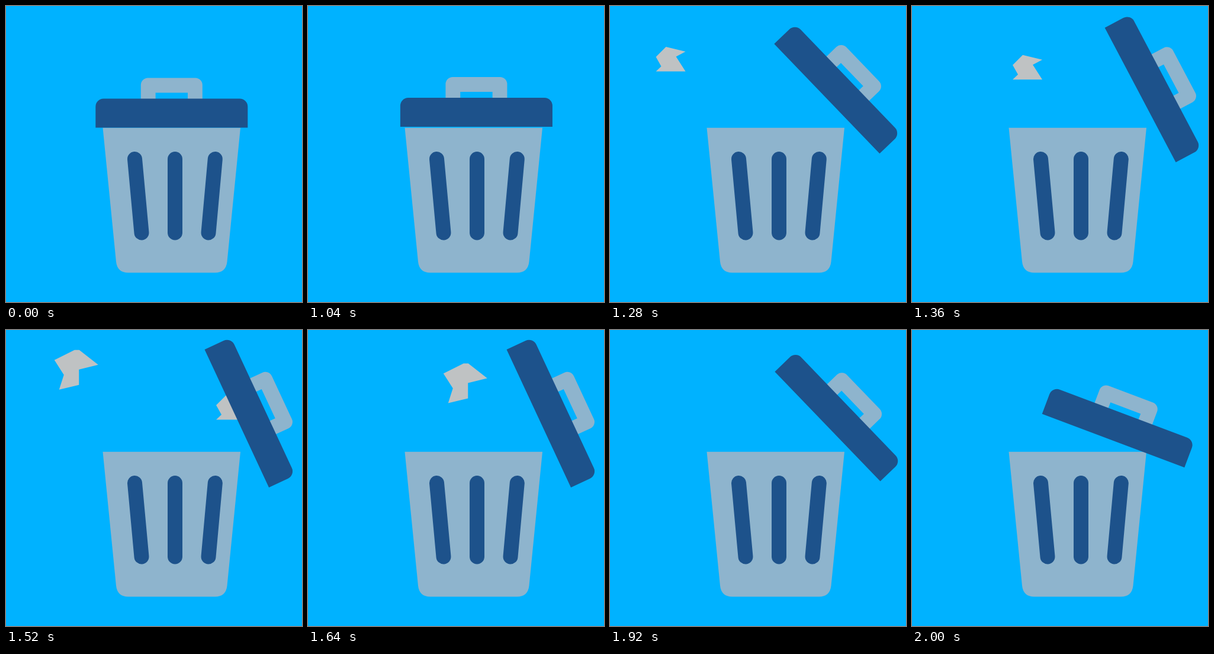
These frames come from a looping animation (500x500 px, 2.04 s). An HTML page:

```html
<!DOCTYPE html>
<html lang="en">
<head>
<meta charset="utf-8">
<title>Trash can</title>
<style>
  html, body { margin: 0; width: 100%; height: 100%; overflow: hidden; background: #00b2ff; }
  svg { display: block; width: 100vw; height: 100vh; }
  .light { fill: #8eb4cd; }
  .dark { fill: #1d528b; }
  .paper { fill: #bfc2c3; }
  .slots { fill: none; stroke: #1d528b; stroke-width: 25; stroke-linecap: round; }
</style>
</head>
<body>
<svg viewBox="0 0 500 500">
  <clipPath id="stage"><rect x="8" width="484" height="500"/></clipPath>
  <g clip-path="url(#stage)" class="paper">
    <path id="small" d="M-25 -4L-8 -21L25 -13L9 -4.5L25 20.5H-25L-16 12Z"/>
    <path id="large" d="M-37 -16L-3 -33H5L37 -8L4.5 0V26L-29 34L-21 9Z"/>
  </g>
  <path class="light" d="M163.5 205.8H396L373.5 432Q371.5 450.5 353 450.5H206.5Q188 450.5 186 432Z"/>
  <path class="slots" d="M217.5 258.5L229 383M285.5 258.5V383M353.3 258.5L342 383"/>
  <g id="lid">
    <path class="light" d="M-52 -48V-72A12 12 0 0 1 -40 -84H40A12 12 0 0 1 52 -72V-48H27.2V-59H-27.2V-48Z"/>
    <path class="dark" d="M-128.5 0V-35.5A13.5 13.5 0 0 1 -115 -49H115A13.5 13.5 0 0 1 128.5 -35.5V0Z"/>
  </g>
</svg>
<script>
  const LOOP = 2040, STEP = 40;
  const OPENING = 1000, OPEN = 1400, TURN = 1600;

  const small = { hit: 1520, x: 380, y: 131, vx: 1.156, vy: 0.1705 };
  const large = { hit: 1690, x: 327, y: 99, vx: 1.225, vy: 0.19 };

  // Power ease in and out; mid is the value reached at half time
  function ease(t, from, to, power, mid) {
    const u = Math.min(1, Math.max(0, (t - from) / (to - from)));
    return u < 0.5
      ? mid * (2 * u) ** power
      : 1 - (1 - mid) * (2 - 2 * u) ** power;
  }

  function place(id, x, y, angle = 0) {
    document.getElementById(id)
      .setAttribute("transform", `translate(${x} ${y}) rotate(${angle})`);
  }

  // Closing runs the opening backwards on a lower path
  function moveLid(t) {
    const closing = t > TURN;
    const time = closing ? 2 * TURN - t : t;
    const across = ease(time, OPENING, OPEN, 1.57, closing ? 0.547 : 0.525);
    const up = ease(time, OPENING, OPEN, 2, closing ? 0.33 : 0.646);
    const turn = ease(time, OPENING + 80, OPEN, 1.73, 0.522);
    place("lid", 279.8 + 110 * across, 205.5 - 56 * up, 65 * turn);
  }

  // Straight flight to the lid, then a drop into the can
  function throwPaper(id, p, t) {
    const flight = Math.min(0, t - p.hit);
    const fall = Math.min(160, Math.max(0, t - p.hit));
    place(id,
      p.x + p.vx * flight - 0.25 * fall,
      p.y + p.vy * flight + 0.75 * fall + 0.0025 * fall * fall);
  }

  function draw(t) {
    moveLid(t < OPENING + STEP ? 0 : t);
    throwPaper("small", small, t);
    throwPaper("large", large, t);
  }

  const start = performance.now();
  function tick() {
    const t = performance.now() - start + 0.5;
    draw(Math.floor(t % LOOP / STEP) * STEP);
    requestAnimationFrame(tick);
  }
  tick();
</script>
</body>
</html>
```
